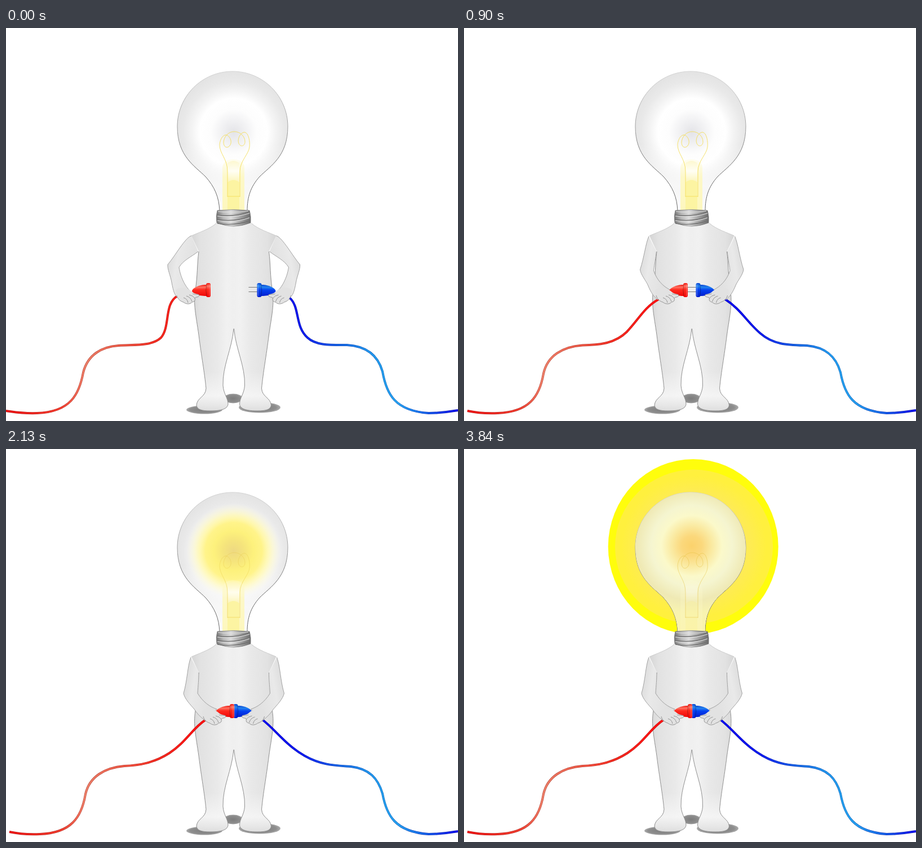
An HTML page for the animation above (4540 ms loop, 802 by 698 pixels).

```html
<!DOCTYPE html>
<html lang="en">
<head>
<meta charset="utf-8">
<title>Bulb figure</title>
<style>
  html, body { margin: 0; width: 100%; height: 100%; overflow: hidden; background: #fff; }
  svg { display: block; width: 100%; height: 100%; }
  .step { visibility: hidden; animation: 4540ms step-end infinite; }
  .cable { fill: none; stroke-linecap: butt; }
</style>
</head>
<body>
<svg id="stage" viewBox="0 0 802 698">
  <defs>
    <radialGradient id="glass" gradientUnits="userSpaceOnUse" cx="404" cy="185" r="150">
      <stop offset="0" stop-color="#e4e4e8"/><stop offset=".12" stop-color="#efeff1"/>
      <stop offset=".27" stop-color="#fdfdfd"/><stop offset=".4" stop-color="#fff"/>
      <stop offset=".5" stop-color="#f3f3f3"/><stop offset=".6" stop-color="#e9e9e9"/>
      <stop offset=".72" stop-color="#e3e3e3"/><stop offset=".9" stop-color="#f1f1f2"/><stop offset="1" stop-color="#eee"/>
    </radialGradient>
    <linearGradient id="neck" gradientUnits="userSpaceOnUse" x1="0" y1="205" x2="0" y2="280">
      <stop offset="0" stop-color="#fff" stop-opacity="0"/><stop offset="1" stop-color="#fff" stop-opacity=".7"/>
    </linearGradient>
    <linearGradient id="rim" gradientUnits="userSpaceOnUse" x1="0" y1="77" x2="0" y2="250">
      <stop offset="0" stop-color="#d4d4d4"/><stop offset=".5" stop-color="#a8a8a8"/><stop offset="1" stop-color="#6c6c6c"/>
    </linearGradient>
    <linearGradient id="stemSide" x2="0" y2="1">
      <stop offset="0" stop-color="#fffce0" stop-opacity=".5"/><stop offset=".35" stop-color="#fdf8c8"/><stop offset="1" stop-color="#fdf7be"/>
    </linearGradient>
    <linearGradient id="stemTop" x2="0" y2="1">
      <stop offset="0" stop-color="#fdf8d0"/><stop offset=".5" stop-color="#fffef4"/><stop offset="1" stop-color="#fcf6c0"/>
    </linearGradient>
    <linearGradient id="metal">
      <stop offset="0" stop-color="#737373"/><stop offset=".2" stop-color="#b5b5b5"/><stop offset=".42" stop-color="#dcdcdc"/>
      <stop offset=".7" stop-color="#a2a2a2"/><stop offset="1" stop-color="#6b6b6b"/>
    </linearGradient>
    <linearGradient id="skin" gradientUnits="userSpaceOnUse" x1="330" y1="0" x2="478.5" y2="0">
      <stop offset="0" stop-color="#d6d6d6"/><stop offset=".1" stop-color="#e2e2e2"/><stop offset=".3" stop-color="#e9e9e9"/>
      <stop offset=".42" stop-color="#f1f1f1"/><stop offset=".5" stop-color="#efefef"/>
    </linearGradient>
    <linearGradient id="foot" gradientUnits="userSpaceOnUse" x1="0" y1="610" x2="0" y2="682">
      <stop offset="0" stop-color="#f6f6f6" stop-opacity="0"/><stop offset=".6" stop-color="#f6f6f6" stop-opacity=".85"/>
      <stop offset="1" stop-color="#dcdcdc"/>
    </linearGradient>
    <linearGradient id="limb" x2="1" y2=".35">
      <stop offset="0" stop-color="#d6d6d6"/><stop offset=".4" stop-color="#e9e9e9"/><stop offset="1" stop-color="#e0e0e0"/>
    </linearGradient>
    <linearGradient id="redPlug" x2="0" y2="1">
      <stop offset="0" stop-color="#f2160e"/><stop offset=".22" stop-color="#ff7262"/>
      <stop offset=".45" stop-color="#ff2a1e"/><stop offset="1" stop-color="#f00808"/>
    </linearGradient>
    <linearGradient id="bluePlug" x2="0" y2="1">
      <stop offset="0" stop-color="#0844d4"/><stop offset=".22" stop-color="#2484ee"/>
      <stop offset=".48" stop-color="#0440f0"/><stop offset="1" stop-color="#0020d0"/>
    </linearGradient>
    <linearGradient id="redWire" gradientUnits="userSpaceOnUse" x1="0" y1="0" x2="330" y2="0">
      <stop offset="0" stop-color="#f01010"/><stop offset=".3" stop-color="#f03c2e"/>
      <stop offset=".43" stop-color="#f0836c"/><stop offset=".62" stop-color="#ee5c48"/>
      <stop offset=".8" stop-color="#f42c20"/><stop offset="1" stop-color="#ff1414"/>
    </linearGradient>
    <linearGradient id="blueWire" gradientUnits="userSpaceOnUse" x1="470" y1="0" x2="802" y2="0">
      <stop offset="0" stop-color="#0c0cf4"/><stop offset=".18" stop-color="#0c1cf0"/><stop offset=".36" stop-color="#1668e6"/>
      <stop offset=".52" stop-color="#2299ee"/><stop offset=".68" stop-color="#26a4f0"/>
      <stop offset=".82" stop-color="#1468ea"/><stop offset="1" stop-color="#0c0cf0"/>
    </linearGradient>
    <linearGradient id="blueEdge" gradientUnits="userSpaceOnUse" x1="470" y1="0" x2="802" y2="0">
      <stop offset=".1" stop-color="#0404b8"/><stop offset=".6" stop-color="#0a6cc0"/><stop offset="1" stop-color="#0404b8"/>
    </linearGradient>
    <linearGradient id="redEdge" gradientUnits="userSpaceOnUse" x1="0" y1="0" x2="330" y2="0">
      <stop offset="0" stop-color="#c00808"/><stop offset=".45" stop-color="#b84a3a"/><stop offset="1" stop-color="#d00808"/>
    </linearGradient>
    <radialGradient id="shade">
      <stop offset="0" stop-color="#7c7c7c"/><stop offset=".8" stop-color="#8e8e8e"/><stop offset="1" stop-color="#acacac"/>
    </radialGradient>

    <path id="bulb" d="M379,325 C378,300 370,282 354,264 C335,245 304,228 304,175 C304,121 348,77 402,77 C456,77 500,121 500,175 C500,228 469,245 450,264 C434,282 428,300 428,325Z"/>
    <clipPath id="inBulb"><use href="#bulb"/></clipPath>
    <path id="wire" fill="none" d="M393,300 V255 C393,232 379,224 379,207 C380,196 386,189 391,190 C398,192 402,203 397,209 C392,215 386,211 386,203 C387,192 395,184 405,184 C415,184 424,192 424,202 C424,210 416,212 413,205 C410,198 415,186 423,185 C431,186 433,203 432,211 C431,224 415,236 415,255 V300 M393,299 H415"/>
    <g id="stem">
      <path d="M384,325 V248 Q385,234 403,233 Q422,234 423,248 V325Z" fill="url(#stemSide)"/>
      <path d="M393,272 V240 Q404,232 414,240 V272Z" fill="url(#stemTop)"/>
      <path d="M393,325 V274 Q404,266 414,274 V325Z" fill="#fcf4a2"/>
    </g>
    <g id="leg">
      <path d="M404.5,340 L373,346 C362,357 340,364 329,369 L342,397 C339,420 340,440 336,465 C332,490 337,510 342,545 C347,585 352,610 355,640 C354,656 339,656 338,670 C339,678 348,680 362,680 C378,680 393,678 394,668 C394,657 386,650 385,635 C384,600 401,570 403.5,534 L404.5,534Z" fill="url(#skin)"/>
      <path d="M347,585 C351,610 353,625 355,640 C354,656 339,656 338,670 C339,678 348,680 362,680 C378,680 393,678 394,668 C394,657 386,650 385,635 Q385,610 391,585Z" fill="url(#foot)"/>
      <path d="M373,347 C362,357 340,364 329,369" fill="none" stroke="#c6c6c6" stroke-width=".8"/>
      <path d="M342,397 C339,420 340,440 336,465 C332,490 337,510 342,545 C347,585 352,610 355,640 C354,656 339,656 338,670 C339,678 348,680 362,680 C378,680 393,678 394,668 C394,657 386,650 385,635 C384,600 401,570 404,534" fill="none" stroke="#858585" stroke-width=".9"/>
    </g>
    <g id="hand">
      <path d="M301,466 C308,458 322,461 331,469 C335,473 343,472 343,475 C342,479 336,477 335,480 C337,487 330,486 329,488 C324,492 317,489 315,487 C308,485 302,478 301,466Z" fill="#e2e2e2"/>
      <path d="M331,472 C335,474 343,472 343,475 C342,479 336,477 335,480 C337,487 330,486 329,488 C324,492 317,489 315,487 C308,485 304,480 303,475 M315,479 q7,2 8,9 M320,476 q8,2 10,10 M325,474 q7,1 10,6" fill="none" stroke="#8c8c8c" stroke-width=".9"/>
    </g>
    <g id="plug">
      <path d="M357,456 C345,455 331,461 330,467 C331,474 345,476 357,476Z"/>
      <rect x="355" y="453" width="8" height="25" rx="3"/>
      <path d="M356,455 Q353.5,465 356,476" fill="none" stroke="#000" stroke-opacity=".3"/>
      <path d="M361,455 V476" stroke="#fff" stroke-opacity=".25" stroke-width="1.5"/>
    </g>
  </defs>

  <g id="halos"></g>
  <use href="#bulb" fill="url(#glass)"/>
  <use href="#bulb" fill="url(#neck)"/>
  <use href="#bulb" fill="none" stroke="url(#rim)"/>
  <use href="#stem"/>
  <use href="#wire" stroke="#f4de5c" stroke-width=".9"/>
  <g id="glows" clip-path="url(#inBulb)"></g>

  <g fill="url(#shade)">
    <ellipse cx="352" cy="678" rx="32" ry="7.5"/>
    <ellipse cx="403" cy="658" rx="17" ry="8.5"/>
    <ellipse cx="450" cy="674" rx="37" ry="9.5"/>
  </g>
  <use href="#leg"/>
  <use href="#leg" transform="matrix(-1 0 0 1 808.5 0)"/>
  <path d="M375,324 Q404,321 432,324 Q435,334 434,346 Q404,358 374,346 Q372,334 375,324Z" fill="url(#metal)" stroke="#777" stroke-width=".7"/>
  <g fill="none" stroke-width="1.4">
    <path d="M374,332 Q404,336 433,327 M374,340 Q404,345 434,335 M375,347 Q404,352 434,342" stroke="#707070"/>
    <path d="M375,334 Q404,338 432,329 M375,342 Q404,347 432,337 M376,326 Q404,329 430,325" stroke="#e2e2e2" stroke-opacity=".7"/>
  </g>
  <g id="poses"></g>
</svg>
<script>
const LOOP = 4540;
const $ = id => document.getElementById(id);

// Three key poses; the steps between them are blended.
const arms = [
  'M329,369 C318,372 300,405 287,420 C286,428 292,440 294,452 C297,468 299,474 304,478 L328,468 C320,462 310,445 307,425 C315,412 328,407 341,397',
  'M328,370 C322,382 318,402 310,424 C310,432 316,440 318,450 C322,468 326,476 333,482 L357,468 C346,460 335,448 333,428 C336,415 338,408 341,397',
  'M328,370 C322,385 322,410 315,434 C317,444 328,455 334,462 C342,474 348,478 354,483 L374,462 C362,458 350,450 340,434 C341,418 342,410 342,397'
];
const redWires = [
  'M304,476 C280,490 292,530 275,550 C258,566 225,562 200,564 C170,566 145,580 137,612 C130,650 115,682 55,684 C30,685 15,682 0,680',
  'M336,483 C310,495 300,515 287,540 C270,566 235,564 210,564 C175,566 148,582 141,615 C134,655 115,682 60,684 C35,685 20,683 6,680',
  'M354,481 C330,497 320,520 290,540 C262,558 235,562 210,563 C175,566 148,582 141,613 C134,655 115,682 60,684 C35,685 20,683 6,680'
];
const blueWires = [
  'M503,479 C522,495 512,530 535,550 C550,564 575,563 605,563 C640,565 660,582 668,610 C675,650 690,680 750,684 C775,684 790,681 802,679',
  'M472,483 C500,497 510,520 522,540 C540,565 570,564 605,564 C640,566 660,583 668,611 C675,650 690,680 750,684 C775,684 790,681 802,679',
  'M454,480 C480,500 495,525 530,545 C560,562 585,562 612,564 C645,568 660,585 668,612 C675,650 690,680 750,684 C775,684 790,681 802,679'
];
const plugShift = [0, 13, 25, 34, 42];
const handShift = [0, 14, 28, 38, 47];

function blend(keys, i) {
  const a = keys[i >> 1], b = keys[(i + 1) >> 1].match(/\d+/g);
  let n = 0;
  return a.replace(/\d+/g, v => (+v + +b[n++]) / 2);
}

const cable = (d, name) =>
  `<path class="cable" d="${d}" stroke="url(#${name}Edge)" stroke-width="4"/>
   <path class="cable" d="${d}" stroke="url(#${name}Wire)" stroke-width="2.6"/>`;

function pose(i) {
  const flip = 'matrix(-1 0 0 1 808.5 0)';
  const arm = `<path d="${blend(arms, i)}" fill="url(#limb)" stroke="#9a9a9a" stroke-width=".9"/>`;
  const hand = `<use href="#hand" x="${handShift[i]}"/>`;
  const plug = paint => `<use href="#plug" x="${plugShift[i]}" fill="url(#${paint})"/>`;
  const prongs = `<path d="M362,460.5 h16 M362,468.5 h16" transform="translate(${plugShift[i]} 0)" stroke="#777" stroke-width="1.1"/>`;
  return cable(blend(redWires, i), 'red') + cable(blend(blueWires, i), 'blue') +
    `<g transform="${flip}">${arm}${prongs}${plug('bluePlug')}${hand}</g>` +
    arm + plug('redPlug') + hand;
}

// Radial light: stops are "offset colour opacity".
function light(id, cx, cy, r, stops) {
  const list = stops.map(s => {
    const [o, c, a = 1] = s.split(' ');
    return `<stop offset="${o}" stop-color="${c}" stop-opacity="${a}"/>`;
  }).join('');
  return `<radialGradient id="${id}" gradientUnits="userSpaceOnUse" cx="${cx}" cy="${cy}" r="${r}">${list}</radialGradient>
    <use href="#bulb" fill="url(#${id})"/>`;
}
const inner = (wire, stem) =>
  `<use href="#stem" opacity="${stem}"/><use href="#wire" stroke="#e2bd3a" stroke-width=".9" opacity="${wire}"/>`;

const glows = [
  light('l0', 403, 183, 62, ['0 #f2e08a .9', '.3 #fbee84 .9', '.6 #fff594 .7', '1 #fffbd0 0']) + inner(.4, .5),
  light('l1', 404, 181, 84, ['0 #eed982', '.22 #f5e47c', '.42 #fdf17c', '.6 #fff384 .95', '.76 #fff69c .6', '1 #fffbd8 0']) + inner(.35, .6),
  light('l2', 403, 175, 112, ['0 #eff08e', '.25 #f7f486', '.5 #fff47c', '.63 #fff07c', '.75 #fdf09a .85', '.87 #f0e9bc .6', '1 #f4f0d8 .2']) + inner(.25, .35),
  light('l3', 403, 172, 150, ['0 #f3da92', '.16 #f5e19a', '.3 #f8eea6', '.43 #fbf8ba', '.55 #fcf2a4', '.66 #fdec84', '.8 #fcf2a0', '1 #f8f6d6']) + inner(.45, .35),
  light('l4', 404, 172, 150, ['0 #fbd26c', '.12 #fbd87c', '.24 #faeaa2', '.36 #fbf9ca', '.48 #f5f5d0', '.65 #efe9b4', '.8 #f8f3b0', '1 #faf3ae']) + inner(.5, .35)
];
const halos = ['', '', '',
  `<ellipse cx="401" cy="167" rx="117" ry="126.5" fill="#ffec40"/>
   <ellipse cx="400.5" cy="168" rx="130" ry="133" fill="none" stroke="#fff19a" stroke-width="1" stroke-dasharray="46 28 4 24"/>`,
  `<radialGradient id="sun"><stop offset=".6" stop-color="#fde95e"/><stop offset=".92" stop-color="#fff03e"/></radialGradient>
   <ellipse cx="406.7" cy="173.5" rx="151" ry="155.5" fill="#fffd0c"/>
   <ellipse cx="408" cy="173.5" rx="140" ry="137" fill="url(#sun)"/>`
];

let rules = '';
function show(layer, name, content, from, to) {
  if (!content) return;
  const pct = t => (t / LOOP * 100).toFixed(4) + '%';
  const on = '{visibility:visible}', off = '{visibility:hidden}';
  rules += `@keyframes ${name}{${from ? '0%' + off : ''}${pct(from)}${on}${to < LOOP ? pct(to) + off : ''}100%${to < LOOP ? off : on}}`;
  $(layer).insertAdjacentHTML('beforeend', `<g class="step" style="animation-name:${name}">${content}</g>`);
}

const glowAt = [1500, 2130, 2700, 3270, 3840, LOOP];
for (let i = 0; i < 5; i++) {
  show('poses', 'pose' + i, pose(i), i * 300, i < 4 ? i * 300 + 300 : LOOP);
  show('glows', 'glow' + i, glows[i], glowAt[i], glowAt[i + 1]);
  show('halos', 'halo' + i, halos[i], glowAt[i], glowAt[i + 1]);
}
document.head.appendChild(document.createElement('style')).textContent = rules;
</script>
</body>
</html>
```
